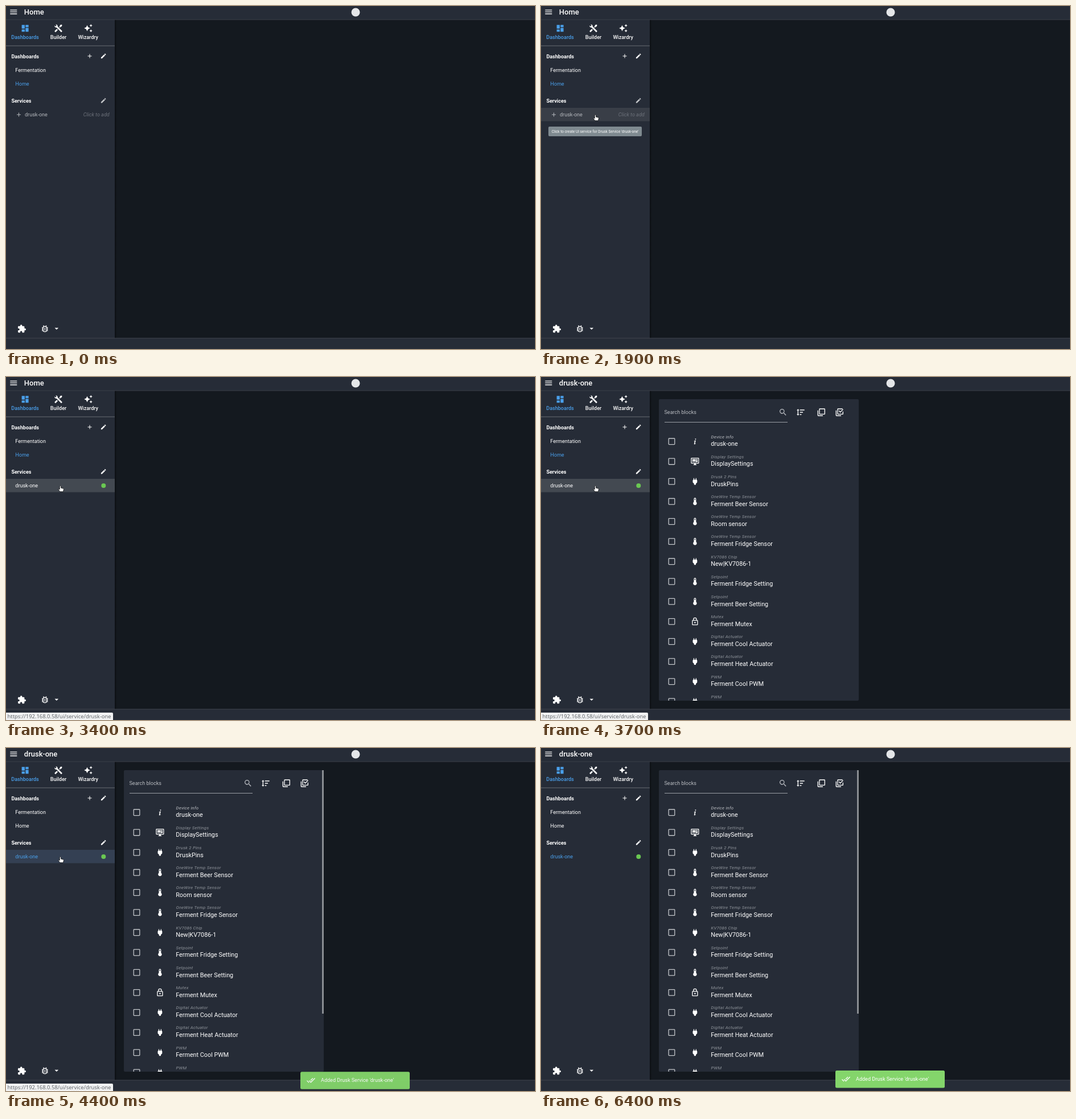
Animation of 929x603 px, one loop 7000 ms. Source, as an HTML page:

```html
<!DOCTYPE html>
<html lang="en">
<head>
<meta charset="utf-8">
<title>Adding a service</title>
<style>
  html, body { margin: 0; width: 100%; height: 100%; overflow: hidden; background: #14191f; }
  svg { display: block; width: 929px; height: 603px; }
  text { font-family: Roboto, "Liberation Sans", sans-serif; font-size: 9.05px; fill: #fff; white-space: pre; }
  .tab { font-weight: 500; text-anchor: middle; }
  .head { font-weight: 700; }
  .title { font-size: 13px; font-weight: 500; }
  .kind { font-size: 7.75px; font-style: italic; letter-spacing: .0333em; fill: #8f949b; }
  .name { font-size: 10.8px; }
  .tip { font-size: 6.45px; }
  .url { font-family: "Noto Sans", "Open Sans", sans-serif; font-size: 9.4px; fill: #63676c; }
</style>
</head>
<body>
<svg id="stage" viewBox="0 0 929 603" xmlns="http://www.w3.org/2000/svg"></svg>
<script>
const LOOP = 7000, STEP = 100, BLUE = '#4a9fea', PANEL = '#262c37';

const icons = {
  menu: 'M3 18h18v-2H3zM3 13h18v-2H3zM3 6v2h18V6z',
  board: 'M3 13h8V3H3zM3 21h8v-6H3zM13 21h8V11h-8zM13 3v6h8V3z',
  tools: 'M21.7 20.3L20.3 21.7A1 1 0 0 1 18.9 21.7L7 9.85A3.8 3.8 0 0 1 6 10A4 4 0 0 1 2.2 4.7L4.76 7.24L7.24 4.76L4.7 2.2A4 4 0 0 1 10 6A3.8 3.8 0 0 1 9.85 7L21.7 18.9A1 1 0 0 1 21.7 20.3M2.3 18.9A1 1 0 0 0 2.3 20.3L3.7 21.7A1 1 0 0 0 5.1 21.7L10.6 16.25L7.76 13.4M20 2L16 4V6L13.8 8.2L15.8 10.2L18 8H20L22 4Z',
  magic: 'M19 9l1.25-2.75L23 5l-2.75-1.25L19 1l-1.25 2.75L15 5l2.75 1.25zM11.5 9.5L9 4 6.5 9.5 1 12l5.5 2.5L9 20l2.5-5.5L17 12zM19 15l-1.25 2.75L15 19l2.75 1.25L19 23l1.25-2.75L23 19l-2.75-1.25z',
  plus: 'M19 13h-6v6h-2v-6H5v-2h6V5h2v6h6z',
  edit: 'M3 17.25V21h3.75L17.8 9.94l-3.75-3.75zM20.7 7.04c.4-.4.4-1 0-1.4l-2.34-2.34c-.4-.4-1-.4-1.4 0l-1.83 1.83 3.75 3.75z',
  puzzle: 'M20.5 11H19V7a2 2 0 0 0-2-2h-4V3.5a2.5 2.5 0 0 0-5 0V5H4a2 2 0 0 0-2 2v3.8h1.5a2.7 2.7 0 0 1 0 5.4H2V20a2 2 0 0 0 2 2h3.8v-1.5a2.7 2.7 0 0 1 5.4 0V22H17a2 2 0 0 0 2-2v-4h1.5a2.5 2.5 0 0 0 0-5z',
  drop: 'M7 10l5 5 5-5z',
  search: 'M15.5 14h-.8l-.3-.3A6.5 6.5 0 1 0 13.7 14.4l.3.3v.8l5 5L20.5 19zM9.5 14a4.5 4.5 0 1 1 0-9 4.5 4.5 0 0 1 0 9z',
  sort: 'M10 13V11H18V13ZM10 19V17H14V19ZM10 7V5H22V7ZM6 17H8.5L5 20.5L1.5 17H4V7H1.5L5 3.5L8.5 7H6Z',
  boxes: 'M20 16V4H8V16ZM22 16A2 2 0 0 1 20 18H8A2 2 0 0 1 6 16V4A2 2 0 0 1 8 2H20A2 2 0 0 1 22 4ZM16 20V22H4A2 2 0 0 1 2 20V7H4V20Z',
  checks: 'M20 16V10H22V16A2 2 0 0 1 20 18H8A2 2 0 0 1 6 16V4A2 2 0 0 1 8 2H20V4H8V16ZM10.9 7.1L14 10.2L20.6 3.6L22 5L14 13L9.5 8.5ZM16 20V22H4A2 2 0 0 1 2 20V7H4V20Z',
  info: 'M13.5 4a1.5 1.5 0 1 0 .1 0zM13.1 8.8C12 8.9 8.7 11.5 8.7 11.5L9 12L10.1 11.4C12.2 10 10.5 13.1 9.6 18.4C9.2 21 11.6 19.7 12.2 19.3L14.5 17.7L14.2 17.1C13.5 17.5 12.3 18.4 12.2 17.9C12 17.3 13.2 13.4 13.9 10.7C14 10 14.3 8.7 13.1 8.8Z',
  screen: 'M21 16V4H3V16ZM21 2A2 2 0 0 1 23 4V16A2 2 0 0 1 21 18H14V20H16V22H8V20H10V18H3A2 2 0 0 1 1 16V4A2 2 0 0 1 3 2ZM5 6H14V11H5ZM15 6H19V8H15ZM19 9V14H15V9ZM5 12H9V14H5ZM10 12H14V14H10Z',
  plug: 'M16 7V3H14V7H10V3H8V7C7 7 6 8 6 9V14.5L9.5 18V21H14.5V18L18 14.5V9C18 8 17 7 16 7Z',
  temp: 'M15 13V5A3 3 0 0 0 9 5V13A5 5 0 1 0 15 13M12 4A1 1 0 0 1 13 5V8H11V5A1 1 0 0 1 12 4Z',
  lock: 'M12 17A2 2 0 1 1 12 13A2 2 0 0 1 12 17M18 20V10H6V20ZM18 8A2 2 0 0 1 20 10V20A2 2 0 0 1 18 22H6A2 2 0 0 1 4 20V10A2 2 0 0 1 6 8H7V6A5 5 0 0 1 17 6V8ZM12 3A3 3 0 0 0 9 6V8H15V6A3 3 0 0 0 12 3Z',
  done: 'M18 7l-1.4-1.4-6.35 6.35 1.4 1.4zM22.2 5.6L11.7 16.2 7.5 12l-1.4 1.4L11.7 19l12-12zM.4 13.4L6 19l1.4-1.4L1.8 12z'
};

const blocks = [
  ['info', 'Device info', 'drusk-one'],
  ['screen', 'Display Settings', 'DisplaySettings'],
  ['plug', 'Drusk 2 Pins', 'DruskPins'],
  ['temp', 'OneWire Temp Sensor', 'Ferment Beer Sensor'],
  ['temp', 'OneWire Temp Sensor', 'Room sensor'],
  ['temp', 'OneWire Temp Sensor', 'Ferment Fridge Sensor'],
  ['plug', 'KV7086 Chip', 'New|KV7086-1'],
  ['temp', 'Setpoint', 'Ferment Fridge Setting'],
  ['temp', 'Setpoint', 'Ferment Beer Setting'],
  ['lock', 'Mutex', 'Ferment Mutex'],
  ['plug', 'Digital Actuator', 'Ferment Cool Actuator'],
  ['plug', 'Digital Actuator', 'Ferment Heat Actuator'],
  ['plug', 'PWM', 'Ferment Cool PWM'],
  ['plug', 'PWM', 'Ferment Heat PWM']
];

const rect = (x, y, w, h, fill, more = '') =>
  `<rect x="${x}" y="${y}" width="${w}" height="${h}" fill="${fill}" ${more}/>`;
const text = (x, y, str, cls = '', more = '') =>
  `<text x="${x}" y="${y}" class="${cls}" ${more}>${str}</text>`;
const icon = (name, cx, cy, size = 16, fill = '#fff', more = '') =>
  `<path d="${icons[name]}" fill="${fill}" fill-rule="evenodd" transform="translate(${cx - size / 2} ${cy - size / 2}) scale(${size / 24})" ${more}/>`;

function blockRow([name, kind, label], i) {
  return `<g transform="translate(0 ${i * 35.17})">
    <rect x="224.2" y="108" width="10.6" height="10.6" rx=".8" fill="none" stroke="#c3c6ca" stroke-width="1.3"/>
    ${icon(name, 270.4, 113.3, 15.5)}
    ${text(298.5, 107.6, kind, 'kind', i ? '' : 'style="fill:#bcbfc4"')}
    ${text(298.2, 121.3, label, 'name')}</g>`;
}

const bug = `<g transform="translate(60.3 559.3) scale(.667)" fill="none" stroke="#fff" stroke-width="2">
  <rect x="7" y="6" width="10" height="14" rx="5"/>
  <path d="M10 11h4M10 15h4M4 9h3.5M4 13h3M4 17h3.5M16.5 9H20M17 13h3M16.5 17H20M7.7 3.7l3 3M16.3 3.7l-3 3"/></g>`;

document.getElementById('stage').innerHTML = `
  <defs>
    <clipPath id="list"><rect x="207" y="39" width="351" height="530"/></clipPath>
    <linearGradient id="edge"><stop stop-color="#000" stop-opacity=".4"/><stop offset="1" stop-color="#000" stop-opacity="0"/></linearGradient>
  </defs>
  ${rect(0, 0, 929, 603, '#14191f')}
  ${rect(0, 24, 191, 560, PANEL)}
  ${rect(191, 24, 4, 560, 'url(#edge)')}
  ${rect(0, 0, 929, 24, PANEL)}
  ${rect(0, 23.5, 929, 1, '#3a3f48')}
  ${rect(0, 584, 929, 19, PANEL)}
  ${rect(0, 583.5, 929, 1, '#40454e')}
  ${icon('menu', 13.3, 10.4)}
  ${text(31.8, 15, 'Home', 'title', 'id="title"')}
  <circle cx="614" cy="11" r="7.5" fill="#e4e6e8"/>

  ${icon('board', 33.6, 39.2, 16, BLUE)}
  ${icon('tools', 92, 39.2)}
  ${icon('magic', 144.5, 39)}
  ${text(33.5, 57.8, 'Dashboards', 'tab', `style="fill:${BLUE}"`)}
  ${text(92, 57.8, 'Builder', 'tab')}
  ${text(144.2, 57.8, 'Wizardry', 'tab')}
  ${rect(0, 69.5, 191, 1, '#686d75')}
  ${text(9.4, 91.5, 'Dashboards', 'head')}
  ${icon('plus', 147, 88, 12)}
  ${icon('edit', 171.2, 88, 11.6)}
  ${text(16.3, 115.8, 'Fermentation')}
  ${text(16.3, 139.5, 'Home', '', 'id="home"')}
  ${text(9.4, 169.6, 'Services', 'head')}
  ${icon('edit', 171.2, 166.2, 11.6, '#fff', 'id="pencil"')}
  <rect id="row" x="0" y="179" width="191" height="23.5"/>
  <g id="adder">
    ${icon('plus', 22.5, 191, 12, '#b4b7bc')}
    ${text(33, 193.9, 'drusk-one', '', 'style="fill:#b4b7bc"')}
    ${text(181.8, 193.9, 'Click to add', '', 'style="fill:#6c717a;font-style:italic" text-anchor="end"')}
  </g>
  <g id="service">
    ${text(16.3, 193.9, 'drusk-one', '', 'id="link"')}
    <circle cx="171.3" cy="191" r="4" fill="#6ac852"/>
  </g>
  ${icon('puzzle', 27.7, 567.5)}
  ${bug}
  ${icon('drop', 88.8, 567)}

  <g id="page">
    ${rect(207, 39, 351, 530, PANEL, 'rx="2"')}
    ${text(216.5, 65.2, 'Search blocks', '', 'style="fill:#b9bcc1"')}
    ${icon('search', 425, 62, 16, '#b9bcc1')}
    ${rect(217, 79, 216, 1, '#9a9ea4')}
    ${icon('sort', 456, 62)}${icon('boxes', 492.3, 62)}${icon('checks', 524.3, 62)}
    <g clip-path="url(#list)">${blocks.map(blockRow).join('')}</g>
    ${rect(555, 39, 3, 428, '#8a8e93', 'id="thumb"')}
  </g>
  <g id="note">
    ${rect(517, 567, 192, 30.5, '#84d56b', 'rx="2.5"')}
    ${icon('done', 535.5, 582, 15.5)}
    ${text(553, 585.2, "Added Drusk Service 'drusk-one'")}
  </g>
  <g id="tip">
    ${rect(13, 212, 164, 17, '#7f8a90', 'rx="2"')}
    ${text(95, 222.5, "Click to create UI service for Drusk Service 'drusk-one'", 'tip', 'text-anchor="middle"')}
  </g>
  <g id="status">
    <path d="M0 590H186a2 2 0 0 1 2 2V603H0Z" fill="#f1f2f3"/>
    ${text(2.5, 600, 'https://192.168.0.58/ui/service/drusk-one', 'url')}
  </g>
  <g id="cursor" fill="#fff" stroke="#0a0c0f" stroke-width=".8" stroke-linejoin="round">
    <path id="arrow" d="M0 0V10.2L2.4 8L4 11.7L5.8 10.9L4.2 7.3H7.4Z"/>
    <path id="hand" d="M-1.2 1Q0 -.6 1.1 1V4L5 5Q6 5.4 5.9 6.5L5 10.6H-.6L-3.5 7Q-3.8 5.6 -2.4 5.8L-1.2 6.7Z"/>
  </g>`;

const el = Object.fromEntries([...document.querySelectorAll('[id]')].map(e => [e.id, e]));
const set = (e, attrs) => { for (const k in attrs) e.setAttribute(k, attrs[k]); };
const show = (e, on) => set(e, { opacity: +on });
const ramp = (t, from, to) => Math.min(1, Math.max(0, (t - from) / (to - from)));
const easeOut = p => 1 - (1 - p) ** 3;

// time, x, y of the pointer tip
const path = [
  [1000, 112, 23], [1200, 104, 105], [1400, 98, 174], [1500, 96, 187], [1700, 95.5, 191],
  [5300, 95.5, 191], [5400, 97, 162], [5700, 118, 92], [6000, 142, 25], [6100, 149, 7], [6200, 151, 0]
];

function pointer(t) {
  const i = path.findIndex(p => p[0] >= t);
  if (i < 0 || t < path[0][0]) return null;
  const b = path[i], a = path[Math.max(0, i - 1)], p = ramp(t, a[0], b[0]);
  return b === a ? [b[1], b[2]] : [a[1] + (b[1] - a[1]) * p, a[2] + (b[2] - a[2]) * p];
}

function draw(t) {
  const added = t >= 3100, opened = t >= 3700, active = t >= 3800;
  el.title.textContent = opened ? 'drusk-one' : 'Home';
  el.home.style.fill = active ? '#fff' : BLUE;
  el.link.style.fill = active ? BLUE : '#fff';
  show(el.pencil, added ? 1 : .72);
  show(el.adder, !added);
  show(el.service, added);
  set(el.row, {
    fill: active ? '#344053' : added ? '#434951' : '#393e47',
    opacity: ramp(t, 1300, 1600) * (1 - ramp(t, 5400, 5700))
  });

  show(el.page, opened);
  show(el.thumb, ramp(t, 3700, 4000));
  const rise = easeOut(ramp(t, 3750, 4750));
  set(el.note, { opacity: rise, transform: `translate(0 ${50 * (1 - rise)})` });

  const tip = easeOut(ramp(t, 1500, 1900)) * (1 - ramp(t, 3000, 3300));
  set(el.tip, { opacity: tip, transform: `translate(0 ${-15 * (1 - tip)})` });
  show(el.status, ramp(t, 3100, 3400) * (1 - ramp(t, 6100, 6400)));

  const tipAt = pointer(t);
  show(el.cursor, tipAt !== null);
  if (tipAt) {
    const [x, y] = tipAt, onLink = (y > 100 && y < 148) || (y > 179 && y < 203);
    set(el.cursor, { transform: `translate(${x} ${y})` });
    show(el.hand, onLink);
    show(el.arrow, !onLink);
  }
}

const start = performance.now();
function tick() {
  const t = (performance.now() - start) % LOOP;
  draw(Math.floor(t / STEP) * STEP);
  requestAnimationFrame(tick);
}
tick();
</script>
</body>
</html>
```
